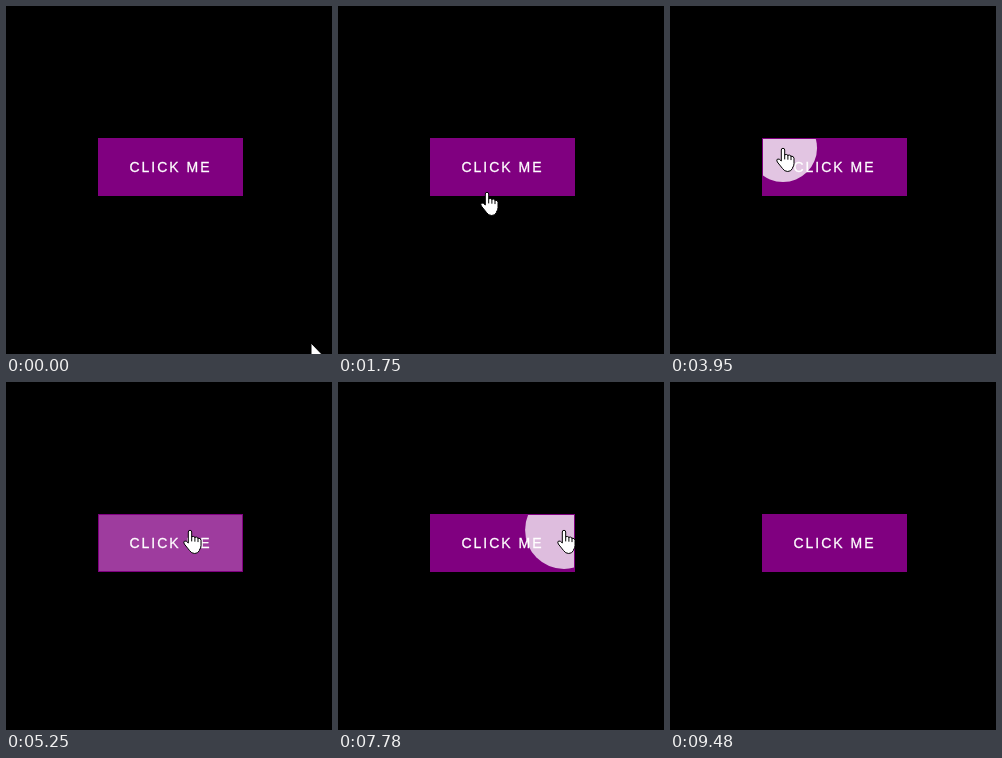
An HTML page that plays this animation: 326 px wide and 348 px high, repeating every 9780 ms.

```html
<!DOCTYPE html>
<html lang="en">
<head>
<meta charset="utf-8">
<title>Ripple button</title>
<style>
  html, body { margin: 0; width: 100%; height: 100%; overflow: hidden; background: #000; }
  svg { display: block; width: 326px; height: 348px; }
  text {
    font: 14px "Liberation Sans", Arial, sans-serif;
    letter-spacing: 2px;
    fill: #fff;
    stroke: #fff;
    stroke-width: .3;
  }
  .cursor path { fill: #fff; stroke: #000; stroke-linejoin: round; }
  .cursor .lines { fill: none; stroke-linecap: round; }
</style>
</head>
<body>
<svg viewBox="0 0 326 348">
  <clipPath id="inside"><rect x="93" y="133" width="143" height="56"/></clipPath>
  <rect x="92" y="132" width="145" height="58" fill="#800080"/>
  <text x="123.4" y="166">CLICK ME</text>
  <g clip-path="url(#inside)"><circle id="ripple" fill="#fff"/></g>
  <g id="cursor" class="cursor">
    <path id="arrow" d="M0 0V16.5L3.8 13l2.6 6 2.6-1.1-2.6-5.9h5.2z"/>
    <g id="hand">
      <path d="M-1.7 2a1.7 1.7 0 0 1 3.4 0V6.8q1.7-1 3.2.5q2-.8 3.1.9q2.7-.3 3 2V15.5q0 2.5-1.6 4.5V20.5Q8 23.5 4.700 23.5Q1.5 23.5-.5 20.5L-5.700 14q-1.2-2.3.3-3q1.700-.5 3.700 2z"/>
      <path class="lines" d="M1.700 6.800v4.200M4.900 7.300v4M8 8.200v3.500"/>
    </g>
  </g>
</svg>
<script>
const LOOP = 9780;
const GROW = 500;   // ripple duration
const REST = 150;   // pause after each press
const RADIUS = 150;

// The pointer arrives, presses, rests and glides on to the next visit
const visits = [
  { arrive: 0, press: -80, x: 305, y: 337 },
  { arrive: 670, press: 840, x: 98, y: 180 },
  { arrive: 1750, press: 1920, x: 149, y: 186 },
  { arrive: 2540, press: 2930, x: 119, y: 175 },
  { arrive: 3480, press: 3879, x: 113, y: 142 },
  { arrive: 4400, press: 4962, x: 185, y: 142 },
  { arrive: 5480, press: 5970, x: 182, y: 160 },
  { arrive: 6400, press: 6560, x: 224, y: 169 },
  { arrive: 7390, press: 7698, x: 226, y: 148 },
  { arrive: 8590, press: 8670, x: 180, y: 183 },
  { arrive: 9480, press: LOOP, x: 294, y: 362 }
];

const $ = id => document.getElementById(id);
const ripple = $("ripple"), cursor = $("cursor"), arrow = $("arrow"), hand = $("hand");
const clamp = p => Math.min(1, Math.max(0, p));
const smooth = p => p * p * (3 - 2 * p);
const overButton = ({ x, y }) => x >= 92 && x < 237 && y >= 132 && y < 190;

function set(el, attrs) {
  for (const name in attrs) el.setAttribute(name, attrs[name]);
}

// cubic-bezier(0, 0, .58, 1)
function easeOut(x) {
  let lo = 0, hi = 1;
  for (let i = 0; i < 20; i++) {
    const s = (lo + hi) / 2;
    if (1.74 * (1 - s) * s * s + s ** 3 < x) lo = s; else hi = s;
  }
  return smooth(lo);
}

function drawRipple(t, from) {
  const grown = overButton(from) ? easeOut(clamp((t - from.press) / GROW)) : 0;
  set(ripple, { cx: from.x, cy: from.y, r: RADIUS * grown, opacity: 1 - grown });
}

function drawCursor(t, from, to) {
  const leave = from.press + REST;
  const p = smooth(clamp((t - leave) / (to.arrive - leave)));
  const mix = axis => Math.round(from[axis] + (to[axis] - from[axis]) * p);
  const spot = { x: mix("x"), y: mix("y") };
  const over = overButton(spot);
  set(cursor, { transform: `translate(${spot.x} ${spot.y})` });
  arrow.style.display = over ? "none" : "";
  hand.style.display = over ? "" : "none";
}

function draw() {
  const t = performance.now() % LOOP;
  const i = visits.findLastIndex(visit => visit.press <= t);
  drawRipple(t, visits[i]);
  drawCursor(t, visits[i], visits[i + 1]);
  requestAnimationFrame(draw);
}
draw();
</script>
</body>
</html>
```
